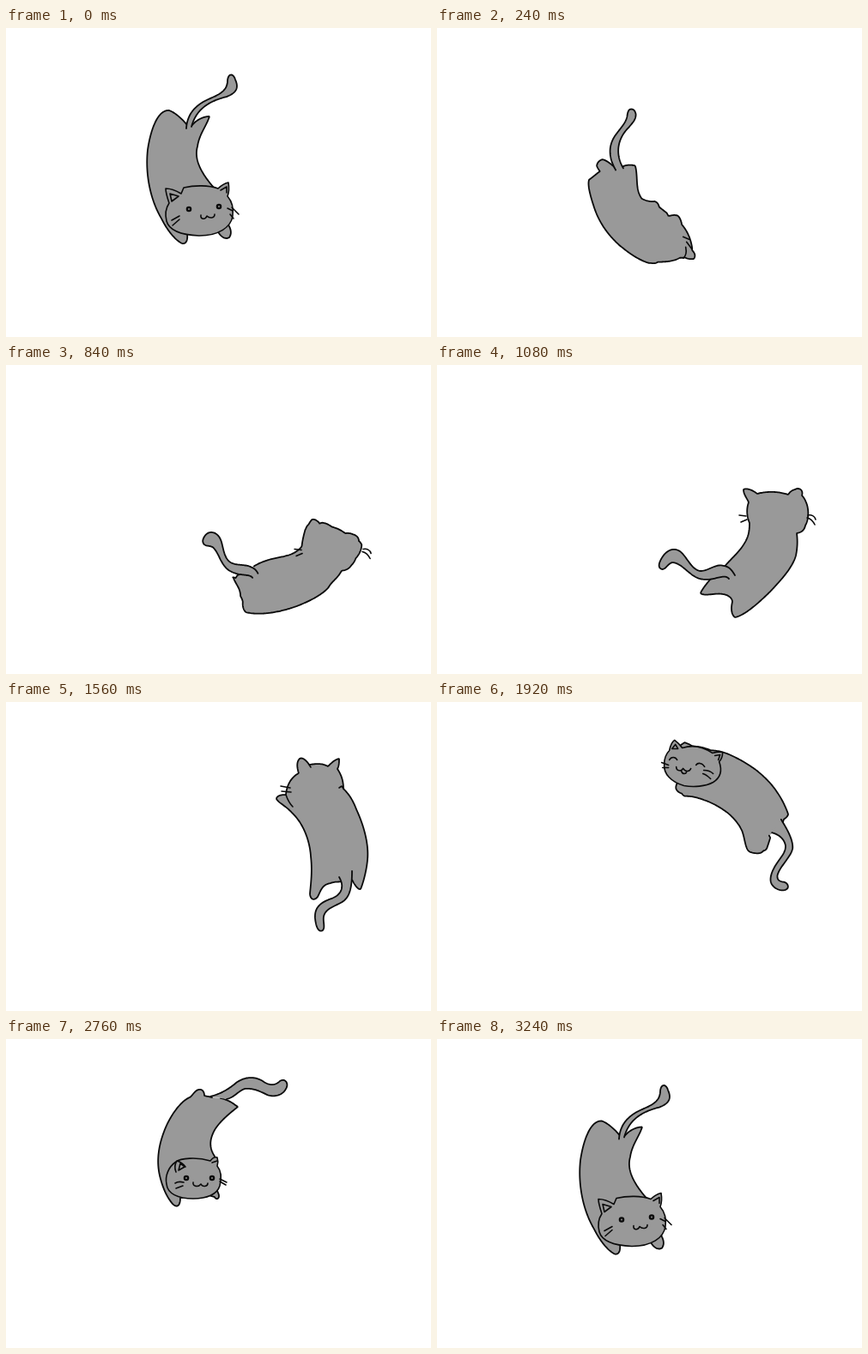
Animation of 495x360 px, one loop 3.36 s. Source, as an HTML page with a canvas:

```html
<!DOCTYPE html>
<html>
<head>
<meta charset="utf-8">
<style>
html, body { margin: 0; width: 495px; height: 360px; overflow: hidden; background: #fff; }
canvas { display: block; }
</style>
</head>
<body>
<canvas id="stage" width="495" height="360"></canvas>
<script>
const STEP = 120, FRAMES = 28;
const ctx = document.getElementById('stage').getContext('2d');

// Outlines start at the tail base; the body runs along the outer side first.
const poses = [
  {
    body: 'M211 113C206 107 198 99 190 96C176 95 168 121 165 142C162 170 168 200 181 222C188 236 197 247 205 251C210 252 212 247 211 239L246 236C250 243 255 247 260 244C263 240 262 235 260 231L243 187C226 168 219 152 223 138C225 124 233 115 237 103C229 103 221 108 217 113',
    tail: 'M210 117C211 100 221 89 238 82C252 76 258 71 258 61C259 52 265 53 267 60C272 71 267 76 257 80C238 85 222 93 216 115',
    at: [225, 212],
    head: 'M190 204C188 198 186 192 186 187C192 187 199 190 204 193L207 186C220 183 236 183 247 187C250 184 255 181 259 180C260 186 260 191 258 196C264 203 265 212 264 219C262 232 248 242 225 242C203 241 190 236 187 225C185 217 186 210 190 204Z',
    lines: 'M191 193L201 196L193 202ZM250 189L257 185L257 192M227 218C226 223 232 224 234 219C237 222 243 222 243 217M202 219L193 224M202 223L194 230M258 210L264 213M263 209L271 217M261 217L265 222',
    eyes: [[213, 211], [248, 208]]
  },
  {
    body: 'M224 215C217 211 211 206 206 208C204 212 208 217 211 219L222 216C210 220 200 222 191 221C188 226 194 236 203 249C214 267 228 277 248 285C264 290 280 292 289 291C296 287 300 291 308 292C322 293 332 291 337 284C344 285 350 282 353 278C350 275 346 273 340 273C342 261 338 247 326 240C326 234 323 229 320 229C317 231 315 236 314 240L312 235L301 231C301 226 298 224 295 226C295 231 290 238 284 244C272 242 268 228 259 218C252 211 243 209 234 209',
    tail: 'M224 216C212 210 199 203 199 188C200 174 206 167 209 155C212 150 217 152 216 158C212 166 207 174 208 184C210 198 222 207 236 210',
    at: [318, 262],
    lines: 'M337 284C341 281 341 276 340 271M337 259L344 262M341 265L347 273'
  },
  {
    body: 'M340 244C332 246 324 246 318 250C314 255 308 262 307 266C312 270 325 265 333 267C340 268 344 272 344 276C342 284 343 291 347 294C358 292 375 277 389 263C402 249 414 236 418 222C420 212 420 204 419 196C425 195 428 192 429 187C433 180 433 170 431 163C429 157 427 154 425 152C427 146 422 142 417 145C413 146 411 148 409 151C397 147 384 147 373 150C368 146 361 143 357 145C357 151 361 155 363 160C360 168 361 177 364 184C364 196 362 202 356 211C349 221 340 228 334 236',
    tail: 'M340 249C334 242 322 253 306 249C293 245 286 231 274 230C268 232 267 238 262 238C256 236 259 229 263 223C270 213 280 212 287 221C293 228 298 239 307 240C316 240 325 231 334 234C341 235 344 240 347 245',
    at: [395, 170],
    lines: 'M352 175L360 176M354 183L361 180M432 175C436 174 440 176 441 180M431 178C435 179 438 182 440 186'
  },
  {
    body: 'M392 209L403 207C406 213 410 219 413 218C416 211 420 196 421 184C423 165 416 142 408 125C404 114 399 107 393 101C393 91 390 84 386 78C388 74 388 70 388 66C383 67 379 71 375 75C368 71 361 72 353 73C350 68 345 64 342 66C338 70 339 77 341 83C333 87 327 96 326 108C321 108 315 109 315 113C318 118 326 121 333 129C347 142 354 163 355 180C357 197 355 212 354 223C354 230 359 232 363 227C367 219 368 213 378 211C383 209 387 210 392 209',
    tail: 'M403 197C403 214 401 226 393 232C384 238 372 240 370 250C369 256 372 262 369 266C364 269 361 262 360 252C359 238 368 233 379 229C390 225 395 216 388 204',
    at: [360, 98],
    lines: 'M320 98L331 100M321 104L332 105M326 108C328 114 331 119 334 122M388 100L391 98L393 101M353 73L355 76'
  },
  {
    body: 'M372 78C367 69 356 61 340 54C325 48 307 46 290 46C270 48 252 50 236 64L211 92C204 97 199 102 200 106C205 107 211 104 216 101L250 108C247 114 245 120 248 122C254 124 257 116 260 110C263 105 266 102 271 101C286 98 301 98 316 99C327 101 335 105 340 110C345 117 347 129 354 131C361 130 358 118 362 109C367 112 373 112 373 108C374 103 371 99 369 97C365 99 364 103 362 109',
    tail: 'M370 76C383 82 398 89 404 99C407 110 402 128 403 141C406 149 411 145 414 140C418 136 424 140 421 145C417 152 410 156 404 154C395 151 398 138 398 126C399 113 400 103 394 97C386 92 376 93 369 97',
    at: [240, 87],
    head: 'M212 68C213 63 215 58 218 56C222 59 225 62 227 65C240 61 252 64 262 71C266 70 270 69 274 70C274 75 272 79 270 81C274 92 271 100 263 105C254 110 240 111 229 109C214 105 205 95 206 84C206 77 208 72 212 68Z',
    lines: 'M215 66L219 61L222 66ZM265 74L271 73L269 79M212 79C214 75 219 75 221 79M243 85C245 82 250 82 253 87M220 87C220 92 226 93 228 89C231 94 236 92 237 89M226 92c1 4 6 4 6 0M203 82L211 85M204 88L211 88M252 91C256 91 260 92 263 95M251 95C255 96 257 98 260 101'
  },
  {
    body: 'M240 68L231 66C231 60 227 57 222 60C218 63 217 66 214 68C204 72 191 89 184 108C176 129 176 146 179 159C182 172 187 184 194 192C199 197 203 195 203 185L236 182L243 184C244 187 248 187 248 183C248 181 247 179 246 177L244 138C236 127 237 117 243 106C249 96 260 87 270 79C263 74 259 71 250 69',
    tail: 'M238 67C250 64 260 58 268 51C278 44 289 43 299 49C307 55 314 54 319 49C325 45 330 52 326 58C322 66 312 68 304 65C296 61 288 57 278 58C270 61 266 68 257 70',
    at: [219, 162],
    head: 'M198 143C203 139 222 137 238 142C240 139 243 137 246 138C247 141 247 145 246 148C251 154 251 163 249 171C246 181 234 186 218 186C200 186 188 180 187 169C185 160 189 149 198 143Z',
    lines: 'M198 155C196 150 197 145 199 142C203 143 207 146 209 149M201 153L203 145L208 149ZM240 144L246 142M218 167C217 172 224 173 227 169C229 173 235 172 235 168M197 168C200 166 203 166 207 167M198 174L206 171M249 163L257 167M249 166L256 170',
    eyes: [[210, 162], [240, 162]]
  }
];

// Body centre and heading (degrees) around the loop
const keys = [
  { frame: 0, x: 205, y: 170, turn: 80 },
  { frame: 4, x: 268, y: 252, turn: 22 },
  { frame: 9, x: 375, y: 218, turn: -57 },
  { frame: 13, x: 382, y: 148, turn: -105 },
  { frame: 19, x: 310, y: 80, turn: -180 },
  { frame: 23, x: 213, y: 120, turn: -258 },
  { frame: 27, x: 207, y: 169.5, turn: -280 }
];

const mix = (a, b, u) => a + (b - a) * u;

function spline(a, b, c, d, u) {
  return b + u / 2 * (c - a + u * (2 * a - 5 * b + 4 * c - d + u * (3 * (b - c) + d - a)));
}

function rotate([x, y], degrees) {
  const r = degrees * Math.PI / 180, c = Math.cos(r), s = Math.sin(r);
  return [x * c - y * s, x * s + y * c];
}

function sample(d, count) {
  const path = document.createElementNS('http://www.w3.org/2000/svg', 'path');
  path.setAttribute('d', d);
  const length = path.getTotalLength();
  return Array.from({ length: count + 1 }, (_, i) => {
    const p = path.getPointAtLength(length * i / count);
    return [p.x, p.y];
  });
}

// Store outlines relative to the centre, turned to a common heading.
poses.forEach((pose, i) => {
  const { x, y, turn } = keys[i];
  const toLocal = p => rotate([p[0] - x, p[1] - y], -turn);
  pose.bodyPoints = sample(pose.body, 400).map(toLocal);
  pose.tailPoints = sample(pose.tail, 160).map(toLocal);
  pose.headPoint = toLocal(pose.at);
  pose.linePath = new Path2D(pose.lines);
  pose.headPath = pose.head && new Path2D(pose.head);
});

function paint(path, width) {
  ctx.lineWidth = width;
  ctx.fill(path);
  ctx.stroke(path);
}

function outline(points) {
  const path = new Path2D();
  points.forEach(p => path.lineTo(p[0], p[1]));
  return path;
}

function draw(frame) {
  let i = 0;
  while (i < 5 && keys[i + 1].frame <= frame) i++;
  const from = keys[i], to = keys[i + 1];
  const before = keys[i ? i - 1 : 5], after = keys[i < 5 ? i + 2 : 1];
  const u = (frame - from.frame) / (to.frame - from.frame);
  const a = poses[i], b = poses[(i + 1) % 6];
  const x = spline(before.x, from.x, to.x, after.x, u);
  const y = spline(before.y, from.y, to.y, after.y, u);
  const turn = mix(from.turn, to.turn, u);

  const place = (p, q) => {
    const r = rotate([mix(p[0], q[0], u), mix(p[1], q[1], u)], turn);
    return [x + r[0], y + r[1]];
  };
  const morph = part => outline(a[part].map((p, n) => place(p, b[part][n])));

  ctx.fillStyle = '#fff';
  ctx.fillRect(0, 0, 495, 360);
  ctx.fillStyle = '#999';
  ctx.strokeStyle = '#0a0a0a';
  ctx.lineCap = ctx.lineJoin = 'round';
  paint(morph('bodyPoints'), 1.8);
  paint(morph('tailPoints'), 1.8);

  const near = u < 0.5 ? a : b;
  const [hx, hy] = place(a.headPoint, b.headPoint);
  ctx.save();
  ctx.translate(hx - near.at[0], hy - near.at[1]);
  if (near.headPath) paint(near.headPath, 1.6);
  ctx.lineWidth = 1.6;
  ctx.stroke(near.linePath);
  ctx.lineWidth = 2.4;
  for (const [ex, ey] of near.eyes || []) {
    ctx.beginPath();
    ctx.arc(ex, ey, 2.1, 0, 2 * Math.PI);
    ctx.stroke();
  }
  ctx.restore();
}

const start = performance.now();
function tick() {
  draw(Math.floor((performance.now() - start) / STEP) % FRAMES);
  requestAnimationFrame(tick);
}
tick();
</script>
</body>
</html>
```
